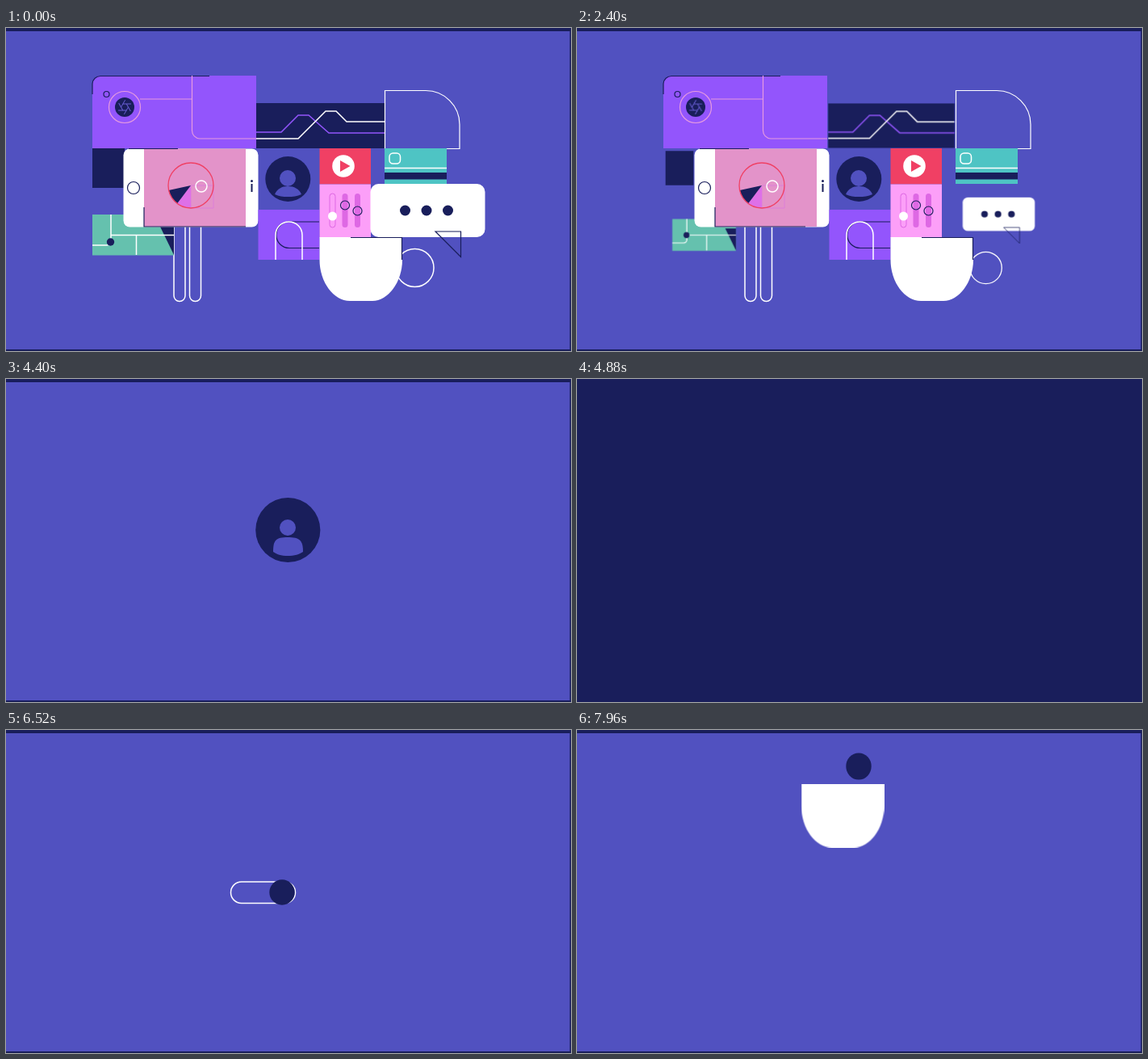
An HTML page for the animation above (8 s loop, 700 by 400 pixels).

```html
<!DOCTYPE html>
<html lang="en">
<head>
<meta charset="utf-8">
<title>Collage loop</title>
<style>
  html, body { margin: 0; width: 100%; height: 100%; overflow: hidden; background: #191e5b; }
  svg { display: block; width: 100vw; height: 100vh; }
  .bg { fill: #5151c0; }
  .navy { fill: #191e5b; }
  .violet { fill: #9355fc; }
  .white { fill: #fff; }
  .line { fill: none; stroke: #fff; stroke-width: 1.5; }
  .line.dark { stroke: #191e5b; stroke-width: 1.2; }
  .line.rose { stroke: #e59ae0; stroke-width: 1.2; }
  .part { transform-box: fill-box; transform-origin: center; }
</style>
</head>
<body>
<svg viewBox="0 0 700 400" preserveAspectRatio="none">
  <defs>
    <path id="cupShape" d="M388.500 259H491V287C491 315 473 338 454 338H426C406 338 388.500 315 388.500 287Z"/>
  </defs>
  <rect class="bg" width="700" height="400"/>

  <g id="legs" class="part line">
    <rect x="208" y="232" width="14" height="106.500" rx="7"/>
    <rect x="227.500" y="232" width="14" height="106.500" rx="7"/>
  </g>
  <g id="band" class="part">
    <rect class="navy" x="310" y="93" width="159" height="56"/>
    <path class="line" style="stroke:#9355fc" d="M310 129H341L362 108H375L400 130H469"/>
    <path class="line" d="M310 137H362L396 103H409L422 116H469"/>
  </g>
  <g id="camera" class="part">
    <path class="violet" d="M107 149V69A10 10 0 0 1 117 59H310V149Z"/>
    <path class="line dark" d="M107 82V69A10 10 0 0 1 117 59.500H252"/>
    <circle class="line dark" cx="124.500" cy="82" r="3.500"/>
    <path class="line rose" d="M166 88H230M230.500 59V127A10 10 0 0 0 240 137H310"/>
    <circle class="line rose" cx="147" cy="98" r="19.500"/>
    <g transform="translate(147 98)">
      <circle class="navy" r="12"/>
      <g id="blades" class="line" style="stroke:#6a5fd6;stroke-width:1"></g>
    </g>
  </g>
  <rect id="block" class="part navy" x="107" y="149" width="40" height="49"/>
  <g id="map" class="part">
    <rect x="107" y="231" width="101" height="50.500" fill="#65c1ae"/>
    <path class="navy" d="M191 246H208V281Z"/>
    <path class="line" d="M107 269H125A5 5 0 0 0 130 264V231M130 256.500H208M161.500 257V281"/>
    <circle id="mapDot" class="navy" cx="129.500" cy="265" r="4.700"/>
  </g>
  <g id="phone" class="part">
    <rect class="white" x="145.500" y="149.500" width="167" height="97" rx="8"/>
    <rect x="171" y="149.500" width="126" height="96.500" fill="#e393c9"/>
    <path class="line dark" d="M152 149.500H213"/>
    <path id="phoneEdge" class="line dark" d="M171 222V246H297"/>
    <circle class="line dark" cx="158" cy="198" r="7.500"/>
    <circle class="navy" cx="304.500" cy="189.500" r="1.500"/>
    <path class="line dark" style="stroke-width:2" d="M304.500 193V203"/>
    <path class="line" style="stroke:#dd7fd8;stroke-width:1" d="M229 195H257V223H229Z"/>
    <path fill="#de70e8" d="M229 195L212 217A28 28 0 0 0 229 223Z"/>
    <path class="navy" d="M229 195L201.500 201A28 28 0 0 0 212 217.500Z"/>
    <circle class="line" style="stroke:#f04064;stroke-width:1.300" cx="229" cy="195" r="28"/>
    <circle class="line" cx="242" cy="196" r="7"/>
  </g>
  <g id="tile" class="part">
    <rect class="violet" x="312.500" y="225" width="76" height="62"/>
    <path class="line dark" d="M388 240H351A16 16 0 0 0 351 272.500H388"/>
    <path class="line" d="M334 287V256.500A16.500 16.500 0 0 1 367 256.500V287"/>
  </g>
  <g id="dome" class="part">
    <path class="line" style="fill:#5151c0;stroke-width:1.200" d="M469.500 149.500V77.500H520A42 42 0 0 1 562 119.500V149.500Z"/>
  </g>
  <g id="card" class="part">
    <rect x="469" y="149" width="77" height="44" fill="#4ec4c4"/>
    <rect class="line" x="475" y="155" width="13.500" height="13" rx="4.500"/>
    <path class="line" d="M469 173.500H546"/>
    <rect class="navy" x="469" y="179" width="77" height="8.500"/>
  </g>
  <g id="play" class="part">
    <rect x="388.500" y="149" width="63.500" height="44.500" fill="#f04064"/>
    <circle class="white" cx="418" cy="171" r="13.800"/>
    <path fill="#f04064" d="M414 164L426.500 171L414 178Z"/>
  </g>
  <g id="sliders" class="part">
    <rect x="388.500" y="193.500" width="63.500" height="66" fill="#fc9ff8"/>
    <g fill="#de68e4">
      <rect x="401" y="205" width="7" height="42" rx="3.500" fill="none" stroke="#de68e4"/>
      <rect x="416.500" y="205" width="7" height="42" rx="3.500"/>
      <rect x="432" y="205" width="7" height="42" rx="3.500"/>
    </g>
    <circle class="white" cx="404.500" cy="233" r="5.500"/>
    <circle class="line dark" cx="420" cy="219.500" r="5.500"/>
    <circle class="line dark" cx="435.500" cy="226.500" r="5.500"/>
  </g>
  <circle id="handle" class="part line" cx="506.500" cy="297" r="23.500"/>
  <g id="bubble" class="part">
    <rect class="white" x="451.500" y="193" width="142" height="66" rx="10"/>
    <g class="navy">
      <circle cx="494.500" cy="226" r="6.500"/>
      <circle cx="521" cy="226" r="6.500"/>
      <circle cx="547.500" cy="226" r="6.500"/>
    </g>
    <path class="line dark" d="M532 252H563.500V283.500Z"/>
  </g>
  <g id="cup" class="part">
    <use href="#cupShape" class="white"/>
    <path class="line dark" d="M427 259.500H490.500V287"/>
  </g>

  <circle id="disc" class="navy" cx="349.300" cy="187" r="28"/>
  <circle id="head" class="bg part" cx="349" cy="186" r="10"/>
  <path id="body" class="bg part"/>

  <circle id="ball" class="bg" cx="348.500" cy="200" r="0"/>
  <rect id="toggle" class="line" x="278.500" y="188" width="80" height="26.500" rx="13.250" pathLength="1" stroke-dasharray="1 2"/>
  <g id="flyingCup" style="transform-origin:440px 298px"><use href="#cupShape" class="white"/></g>
  <ellipse id="knob" class="navy" cx="349" cy="201"/>

  <path class="navy" d="M0 0H700V400H0ZM0 4V398H698.500V4Z" fill-rule="evenodd"/>
</svg>
<script>
const LOOP = 8000;
const $ = id => document.getElementById(id);

// Each step is [ms, properties, easing to the next step]; ends are held.
function play(id, steps) {
  const first = steps[0], last = steps[steps.length - 1];
  const all = [[0, first[1]], ...steps, [LOOP, last[1]]];
  $(id).animate(
    all.map(([ms, props, easing = 'ease-in-out']) => ({ offset: ms / LOOP, easing, ...props })),
    { duration: LOOP, iterations: Infinity });
}

const track = (id, name, unit, steps) =>
  play(id, steps.map(([ms, value, easing]) => [ms, { [name]: value + unit }, easing]));

const leave = (id, from, to) => play(id, [
  [from, { transform: 'scale(1)' }, 'ease-in'],
  [to, { transform: 'scale(0)' }],
]);

for (let i = 0; i < 6; i++) {
  $('blades').insertAdjacentHTML('beforeend',
    `<path d="M4.500 0L-.6 8.800" transform="rotate(${i * 60})"/>`);
}

// Collage
play('blades', [
  [0, { transform: 'rotate(0deg)' }],
  [1680, { transform: 'rotate(60deg)' }],
]);
track('mapDot', 'cy', 'px', [[840, 265], [1600, 256.5]]);
play('phoneEdge', [
  [0, { d: 'path("M171 222V246H297")' }],
  [1680, { d: 'path("M171 222V246H283")' }],
]);

const exits = {
  bubble: [2280, 2500], map: [2320, 2520], block: [2340, 2540], handle: [2340, 2520],
  band: [2380, 2600], cup: [2400, 2640], phone: [2440, 2700], tile: [2480, 2700],
  dome: [2520, 2740], camera: [2520, 2760], legs: [2540, 2760],
  card: [2820, 3080], sliders: [2880, 3160], play: [2960, 3280],
};
for (const id in exits) leave(id, ...exits[id]);

// Portrait badge grows until it fills the stage
track('disc', 'r', 'px', [
  [3400, 28], [4200, 32, 'ease-in'], [4400, 40, 'cubic-bezier(.6,.05,.8,.5)'], [4860, 430],
]);
track('head', 'cx', 'px', [[2560, 349], [2800, 357], [3040, 341], [3280, 349]]);
track('head', 'cy', 'px', [[2560, 186], [2800, 184]]);
const small = 'path("M333 206C336 199 342 196 349 196C357 196 363 199 366 206C361 208.500 355 209 349 209C343 209 338 208.500 333 206Z")';
const tall = 'path("M331 214C331 200 334 196 349 196C364 196 368 200 368 214C364 217 357 219 349 219C341 219 335 217 331 214Z")';
play('body', [[3440, { d: small }], [4160, { d: tall }]]);
leave('head', 4480, 4760);
leave('body', 4440, 4720);

// Ball pops in, dips and becomes the background
track('ball', 'cy', 'px', [
  [5280, 200, 'ease-in'], [5560, 279, 'ease-out'], [5880, 201],
]);
track('ball', 'r', 'px', [
  [5040, 0, 'ease-out'], [5280, 26], [5560, 26], [5880, 22, 'ease-in'], [6280, 430],
]);

// Switch
play('toggle', [
  [6160, { strokeDashoffset: 1, opacity: 0 }, 'steps(1, start)'],
  [6161, { strokeDashoffset: 1, opacity: 1 }],
  [6480, { strokeDashoffset: 0, opacity: 1 }],
  [7160, { strokeDashoffset: 0, opacity: 1 }],
  [7439, { strokeDashoffset: 1, opacity: 1 }, 'steps(1, start)'],
  [7440, { strokeDashoffset: 1, opacity: 0 }],
]);
track('knob', 'cx', 'px', [
  [6400, 349], [6520, 342], [6760, 293], [6920, 293], [7160, 349],
]);
track('knob', 'cy', 'px', [
  [7200, 201, 'ease-in'], [7480, 240], [7640, 240, 'ease-out'], [7960, 45],
]);
track('knob', 'rx', 'px', [[6040, 0, 'ease-out'], [6320, 15.7]]);
track('knob', 'ry', 'px', [[6040, 0, 'ease-out'], [6320, 15.7], [7640, 15.7], [7960, 16.5]]);

// Cup swoops in under the ball
play('flyingCup', [
  [7700, { transform: 'translate(-180px,-90px) rotate(-50deg) scale(0)' }, 'ease-out'],
  [7960, { transform: 'translate(-110.5px,-192.500px) rotate(0deg) scale(1)' }],
]);
</script>
</body>
</html>
```
